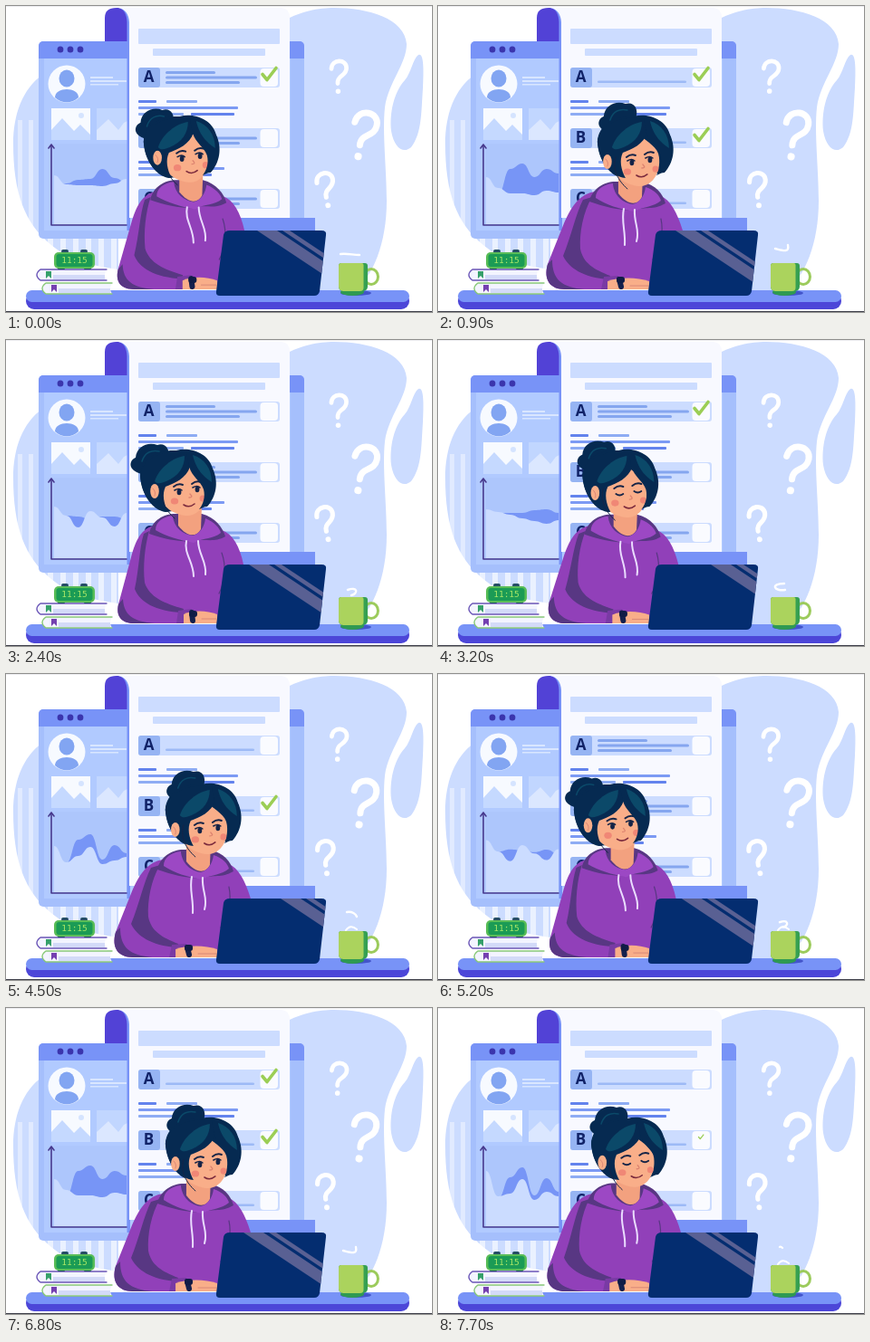
An HTML page with a canvas for the animation above (7.8 s loop, 470x338 px).

```html
<!DOCTYPE html>
<html lang="en">
<head>
<meta charset="utf-8">
<title>Online quiz</title>
<style>
html, body { margin: 0; width: 100%; height: 100%; overflow: hidden; background: #fff; }
canvas { display: block; width: 470px; height: 338px; }
</style>
</head>
<body>
<canvas id="stage" width="470" height="338"></canvas>
<script>
const ctx = document.getElementById('stage').getContext('2d');
const LOOP = 7800, STEP = 100, CYCLE = 2950;
const KEYS = [0, 250, 900, 1550, 1800, 2400, CYCLE];

const BLUE = '#7893f7', PALE = '#ccdcff', PANEL = '#b1caff', FRAME = '#a5bffc';
const PURPLE = '#9140b9', SHADE = '#583783', SKIN = '#f9ae89', HAIR = '#062a51', SHEEN = '#0b4969', INK = '#152447';

const clamp = v => Math.max(0, Math.min(1, v));
const ease = u => (1 - Math.cos(Math.PI * clamp(u))) / 2;
const lerp = (a, b, u) => a + (b - a) * u;
const ramp = (t, from, to) => ease((t - from) / (to - from));

function keyed(rows, p) {
  let i = 0;
  while (i < 5 && p >= KEYS[i + 1]) i++;
  const u = ramp(p, KEYS[i], KEYS[i + 1]);
  const next = rows[(i + 1) % rows.length];
  return rows[i].map((v, k) => lerp(v, next[k], u));
}

// Blend two paths that share the same commands.
function mix(a, b, u) {
  const nums = b.match(/-?[\d.]+/g);
  let i = 0;
  return a.replace(/-?[\d.]+/g, n => lerp(+n, +nums[i++], u).toFixed(2));
}

function fill(d, color) {
  ctx.fillStyle = color;
  ctx.fill(new Path2D(d));
}

function line(d, color, width) {
  ctx.strokeStyle = color;
  ctx.lineWidth = width;
  ctx.lineCap = ctx.lineJoin = 'round';
  ctx.stroke(new Path2D(d));
}

function box(x, y, w, h, color, r = 0) {
  ctx.fillStyle = color;
  ctx.beginPath();
  ctx.roundRect(x, y, w, h, r);
  ctx.fill();
}

function oval(x, y, rx, ry, color) {
  ctx.fillStyle = color;
  ctx.beginPath();
  ctx.ellipse(x, y, rx, ry, 0, 0, Math.PI * 2);
  ctx.fill();
}

function placed(x, y, angle, scale, draw) {
  ctx.save();
  ctx.translate(x, y);
  ctx.rotate(angle * Math.PI / 180);
  ctx.scale(scale, scale);
  draw();
  ctx.restore();
}

function label(text, x, y, font, color) {
  ctx.font = font;
  ctx.fillStyle = color;
  ctx.textAlign = 'center';
  ctx.textBaseline = 'middle';
  ctx.fillText(text, x, y);
}

function backdrop() {
  box(0, 0, 470, 338, '#fff');
  fill('M40 76C18 92 8 120 8 152C8 205 20 240 50 264C68 279 88 286 124 291V76Z', PALE);
  for (let x = 13; x < 36; x += 12) box(x, 126, 5, 125, 'rgba(255,255,255,.4)');
  for (let x = 46; x < 124; x += 14) box(x, 257, 6, 40, 'rgba(255,255,255,.6)');
  fill('M300 20C325 5 345 2 362 2C400 2 440 14 442 42C442 64 422 84 418 112C415 140 420 180 420 215C420 262 405 300 383 315H250V20Z', PALE);
  fill('M455 54C461 51 461 70 460 90C458 118 459 140 447 156C438 164 428 156 425 138C423 118 428 95 440 82C447 74 449 58 455 54Z', PALE);
}

function marks(h) {
  const list = [[367, 78, .95, 0, 3], [394, 143, 1.4, 12, -3], [353, 203, 1.02, -10, 5]];
  for (const [x, y, size, tilt, swing] of list) {
    placed(x, y, tilt + swing * h, size, () => {
      line('M-8.5 -9C-8 -21 9 -21 9 -10C9 0 -2 -2 -1 8', '#fff', 5);
      oval(-.5, 17, 2.9, 2.9, '#fff');
    });
  }
}

function wave(ys) {
  const x = i => 53 + i * 13.35;
  let d = `M53 241V${ys[0]}`;
  for (let i = 1; i < ys.length; i++) {
    const m = (x(i - 1) + x(i)) / 2;
    d += `C${m} ${ys[i - 1]} ${m} ${ys[i]} ${x(i)} ${ys[i]}`;
  }
  return d + 'V241Z';
}

const BACK = [
  [200, 196, 192, 191, 180, 190, 195],
  [190, 191, 191, 191, 188, 187, 191],
  [212, 208, 180, 174, 189, 180, 185],
  [204, 209, 183, 177, 205, 189, 198],
  [200, 210, 187, 176, 207, 188, 203],
  [198, 194, 195, 198, 195, 195, 198]
];
const FRONT = [
  [187, 197, 198, 198, 199, 196, 191],
  [187, 190, 193, 197, 200, 203, 199],
  [189, 201, 207, 207, 209, 204, 206],
  [190, 208, 201, 191, 210, 206, 202],
  [180, 208, 205, 189, 212, 203, 208],
  [184, 194, 207, 189, 196, 206, 191]
];

function browser(p) {
  box(36, 39, 293, 218, FRAME, 5);
  box(36, 39, 293, 19, BLUE, [5, 5, 0, 0]);
  box(42, 58, 272, 190, PANEL);
  for (const x of [60, 71, 82]) oval(x, 48, 3.4, 3.6, '#3b35ad');

  oval(67, 86, 20.5, 20.5, '#f7faff');
  oval(67, 80, 8.5, 9.5, '#82a5f2');
  fill('M54 101C54 89 80 89 80 101C73 108 61 108 54 101Z', '#82a5f2');
  box(93, 78, 25, 2, '#d9e6ff');
  box(93, 82, 40, 2, '#d9e6ff');
  box(93, 86, 31, 1.5, '#d9e6ff');

  box(50, 113, 43, 35, '#f7faff');
  fill('M50 148V137L62 124L75 138L82 131L93 142V148Z', '#c5d9ff');
  oval(83, 121, 3, 3, '#d5e4ff');
  box(100, 113, 34, 35, '#c1d6ff');
  fill('M100 148V137L113 125L124 137L130 129L134 127V148Z', '#dbe7ff');

  box(52, 152, 82, 90, '#adc6fc');
  fill(wave(keyed(BACK, p)), '#7795f6');
  fill(wave(keyed(FRONT, p)), '#cbdcff');
  line('M50 155V242H134', '#47388d', 1.6);
  line('M47 157L50 153L53 157', '#47388d', 1.6);
}

function tick(x, y, size) {
  if (size < .02) return;
  placed(x, y, 0, size, () => line('M-7 0L-2 6L8 -7', '#9bce55', 3.6));
}

function row(name, y, fold) {
  box(146, y, 156, 22, PALE, 3);
  box(146, y, 24, 22, '#96b4f3', 3);
  label(name, 157.5, y + 11.5, 'bold 17px "Open Sans", "Noto Sans", sans-serif', '#112368');
  ctx.globalAlpha = 1 - fold;
  box(176, y + 4, 55, 3, '#85a6ef', 1.5);
  box(176, y + 9.5, 101, 3, '#85a6ef', 1.5);
  box(176, y + 15, 82, 3, '#85a6ef', 1.5);
  ctx.globalAlpha = fold;
  box(176, y + 14.5, 98, 2.4, '#9dbaf6', 1.2);
  ctx.globalAlpha = 1;
  box(280.5, y + 1, 19.5, 20, '#fafbff', 4);
}

function sheet(p) {
  box(250, 234, 91, 15, BLUE);
  fill('M109 39V13Q109 2 122 2H138V39Z', '#5242d6');
  fill('M124 2Q133 4 133.5 18V248H137V2Z', BLUE);
  fill('M124 2H304Q313 3 313 13V234H136V18Q135 4 124 2Z', '#f8f9ff');
  box(146, 25, 156, 17, PALE, 1);
  box(162, 47, 124, 8, PALE, 1);
  const fold = p < 1800 ? ramp(p, 450, 750) : 1 - ramp(p, 1900, 2200);
  'ABC'.split('').forEach((c, i) => row(c, 68 + i * 67, fold));
  for (const [y, end, last] of [[104, 256, 252], [171, 241, 227]]) {
    box(146, y, 20, 3, '#6383ed', 1);
    box(177, y, 34, 3, '#8eacf4', 1);
    box(146, y + 7, end - 146, 3, '#7c9af4', 1);
    box(146, y + 14, 50, 3, '#8eacf4', 1);
    box(204, y + 14, last - 204, 3, '#6383ed', 1);
  }
  const first = p > 2000 ? ramp(p, 2550, 2800) : 1 - ramp(p, 1200, 1400);
  tick(290, 75.5, first);
  tick(290, 142.5, ramp(p, 500, 720) * (1 - clamp((p - 1700) / 155)));
}

function body(h) {
  const m = (a, b) => mix(a, b, h);
  fill(m('M165 205C149 207 143 222 138 240L124 292C121 306 128 313 142 313H238L262 248C258 228 250 214 238 210C220 200 185 198 165 205Z',
         'M174 205C156 207 147 222 139 240L121 285C116 303 124 313 140 313H238L270 248C264 228 256 214 246 210C228 200 194 198 174 205Z'), PURPLE);
  fill(m('M124 292C121 306 128 313 142 313H164C140 311 130 304 129 286Z',
         'M121 285C116 303 124 313 140 313H162C136 311 126 302 126 280Z'), SHADE);
  fill(m('M158 211C153 228 151 250 153 268C158 284 175 291 196 297L195 301C165 300 147 289 142 275C147 252 147 230 152 214Z',
         'M170 211C160 228 156 250 157 268C160 284 172 291 190 298L188 302C160 300 144 289 138 276C147 254 152 230 160 214Z'), SHADE);
  line(m('M238 235C243 249 242 266 235 280', 'M246 235C249 249 246 266 237 280'), SHADE, 1.2);
  fill(m('M190 299L205 297L207 313H188Z', 'M183 299L199 298L201 313H180Z'), '#793aa4');
  fill(m('M196 303C207 298 222 299 233 303V313H196Z', 'M187 304C203 299 220 300 233 304V313H187Z'), SKIN);
  line(m('M216 308H232', 'M212 309H232'), '#d98978', 1);
  line(m('M205 301L206 310', 'M200 302L202 310'), '#14204d', 6);
  box(lerp(202, 197, h), 299, 9, 7, '#101c46', 3);

  fill(m('M158 214C161 199 174 192 187 192H216C231 196 239 207 242 217C228 225 219 218 205 223C188 222 174 220 158 214Z',
         'M167 216C170 202 183 194 196 194H225C241 198 248 207 251 218C237 226 230 221 215 226C198 225 184 222 167 216Z'), SHADE);
  fill(m('M190 184H216L215 209C210 218 200 218 190 205Z', 'M199 188H226L225 211C220 221 209 220 199 207Z'), '#f3a17f');
  fill(m('M165 210C165 201 173 195 184 194C185 207 195 215 206 216C214 214 219 206 220 197C230 201 236 208 237 213C229 220 218 218 207 224C191 221 177 217 165 210Z',
         'M174 212C174 203 182 197 193 196C194 209 204 218 215 219C223 217 228 209 229 200C239 203 245 210 246 215C238 222 228 221 216 227C200 224 186 220 174 212Z'), '#9c48c4');
  line(m('M199 222C196 236 207 245 207 261', 'M205 224C202 238 207 248 206 264'), '#eadcff', 2);
  line(m('M212 222C212 236 222 246 220 259', 'M217 225C216 240 223 247 219 260'), '#eadcff', 2);
}

function eye(x, y, shut) {
  line(`M${x - 6} ${y - 6}Q${x - 1} ${y - 10} ${x + 4} ${y - 8}`, INK, 2);
  if (shut > .5) {
    line(`M${x - 4} ${y}Q${x} ${y + 3} ${x + 4} ${y}`, INK, 1.8);
  } else {
    oval(x, y, 2.4, lerp(3.3, 1, shut), INK);
    line(`M${x - 5} ${y - 2}Q${x} ${y - 5} ${x + 3} ${y - 2}`, INK, 1.6);
  }
}

function features(shut) {
  oval(190, 179, 4.2, 3.6, '#f08776');
  oval(221, 176, 3.4, 3.6, '#f08776');
  eye(195, 169, shut);
  eye(215, 166, shut);
  line('M207 171Q211 175 206 175', '#dc8370', 1.3);
  line('M200 183Q206 187 212 182', '#7b2a3d', 1.6);
}

// Bun, hair and face slide by different amounts as the head turns.
function head(h, p) {
  const shut = Math.max(1 - Math.abs(p - 250) / 130, 1 - Math.abs(p - 1800) / 130, 0);
  const slide = (x, y, draw) => placed(x, y, 0, 1, draw);
  const hairX = lerp(-4, 24, h), faceX = lerp(-4, 19, h), faceY = lerp(-1, 4, h);

  slide(lerp(-5, 35, h), lerp(1, -7, h), () => {
    fill('M146 143C139 137 144 130 148 129C149 116 162 111 172 115C181 112 186 120 184 128C187 138 178 146 168 147C160 149 151 147 146 143Z', HAIR);
    line('M155 133C158 123 166 120 174 122', SHEEN, 1.5);
  });
  slide(hairX, 0, () =>
    fill('M152 150C153 130 172 121 192 122C206 118 227 124 232 142C239 157 236 173 226 184L180 190C166 188 154 172 152 150Z', HAIR));
  slide(faceX, faceY, () => {
    fill('M174 156C180 148 196 144 205 140C212 146 224 152 225 163C227 180 218 194 205 195C192 195 177 187 174 174Z', SKIN);
    features(shut);
  });
  slide(hairX, 0, () => {
    fill('M207 140C203 153 190 158 180 162C176 170 178 181 183 190C165 188 153 170 152 150C154 130 178 120 207 124Z', HAIR);
    fill('M206 140C209 151 219 156 222 165C224 173 222 181 217 187C231 183 239 160 232 143C226 126 212 121 203 124Z', HAIR);
    fill('M168 156C173 141 188 130 201 128C201 140 195 150 181 156C176 158 171 160 168 156Z', SHEEN);
    fill('M210 127C223 131 231 142 231 157C224 152 214 145 210 127Z', SHEEN);
  });
  slide(faceX, faceY, () => {
    oval(168, 168, 4.8, 8, SKIN);
    line('M166 165Q170 169 168 173', '#dc8776', 1);
    line('M177 163C173 177 180 189 190 198', INK, 1);
  });
}

const SHINE = [[277], [301], [262], [303], [273], [268]];

function laptop(p) {
  const lid = 'M247 248H348Q354 248 353 253L346 315Q345 320 340 320H236Q231 320 232 315L240 253Q241 248 247 248Z';
  const [x] = keyed(SHINE, p);
  const stripe = (from, width) =>
    fill(`M${from} 248H${from + width}L${from + width + 108} 320H${from + 108}Z`, '#596093');
  fill(lid, '#042d70');
  ctx.save();
  ctx.clip(new Path2D(lid));
  stripe(x, 22);
  stripe(x + 28, 8);
  ctx.restore();
}

function desk() {
  box(22, 317, 423, 18, '#4c46d8', 9);
  box(22, 314, 423, 13, BLUE, 6.5);
}

function book(x, y, w, mark, cover) {
  const edge = `M${x + w} ${y}H${x + 6}Q${x - 2} ${y + 6} ${x + 6} ${y + 12}H${x + w}`;
  fill(`${edge}Q${x + w - 4} ${y + 6} ${x + w} ${y}Z`, '#f3f4ff');
  box(x + 20, y + 6, w - 22, 5, '#d3daf8');
  line(edge, cover, 1.4);
  fill(`M${x + 12} ${y + 2}H${x + 18}V${y + 10}L${x + 15} ${y + 7}L${x + 12} ${y + 10}Z`, mark);
}

function books() {
  book(38, 306, 79, '#7440b0', '#88c878');
  book(32, 291, 79, '#36a06a', '#6b56b7');
  box(61, 269, 8, 4, '#264e65', 2);
  box(82, 269, 8, 4, '#264e65', 2);
  box(57, 288, 8, 3, '#264e65', 1);
  box(86, 288, 8, 3, '#264e65', 1);
  box(53, 272, 45, 18, '#59bd57', 5);
  box(55.5, 274, 40, 14, '#1b9b55', 3);
  label('11:15', 75.5, 281.5, '9.5px "DejaVu Sans Mono", monospace', '#a8e766');
}

const STEAM = [
  [369, 274, 376, 273, 383, 275, 390, 275],
  [383, 276, 371, 278, 366, 269, 382, 269],
  [372, 268, 380, 270, 388, 273, 386, 264],
  [376, 263, 382, 262, 386, 265, 387, 268],
  [377, 264, 378, 263, 379, 264, 380, 265],
  [377, 276, 388, 272, 389, 280, 381, 282]
];

function cup(p) {
  const s = keyed(STEAM, p);
  line(`M${s[0]} ${s[1]}C${s.slice(2).join(' ')}`, '#fff', 2.4);
  if (p > 1300 && p < 2300) line('M375 283Q380 276 387 282', '#fff', 2);
  oval(386, 317, 17, 3, '#4254ca');
  oval(382, 316, 13, 4, '#2f9a52');
  ctx.strokeStyle = '#9ccb5c';
  ctx.lineWidth = 3;
  ctx.beginPath();
  ctx.ellipse(403, 299, 7.5, 8.5, 0, 0, Math.PI * 2);
  ctx.stroke();
  box(367, 284, 32, 31, '#36a052', [3, 3, 5, 5]);
  box(367, 284, 27.5, 31, '#abd35d', [3, 2, 4, 5]);
}

function draw(now) {
  const t = Math.floor(now % LOOP / STEP) * STEP;
  const p = t % CYCLE;
  const h = p < 1200 ? ramp(p, -300, 950) : p < 2500 ? 1 - ramp(p, 1500, 2400) : ramp(p, 2650, 3900);
  backdrop();
  marks(h);
  browser(p);
  sheet(p);
  desk();
  body(h);
  head(h, p);
  laptop(p);
  books();
  cup(p);
  box(0, 0, 470, 1, '#ececf0');
  box(0, 337, 470, 1, '#3c3d48');
}

const start = performance.now();
function frame() {
  draw(performance.now() - start);
  requestAnimationFrame(frame);
}
frame();
</script>
</body>
</html>
```
